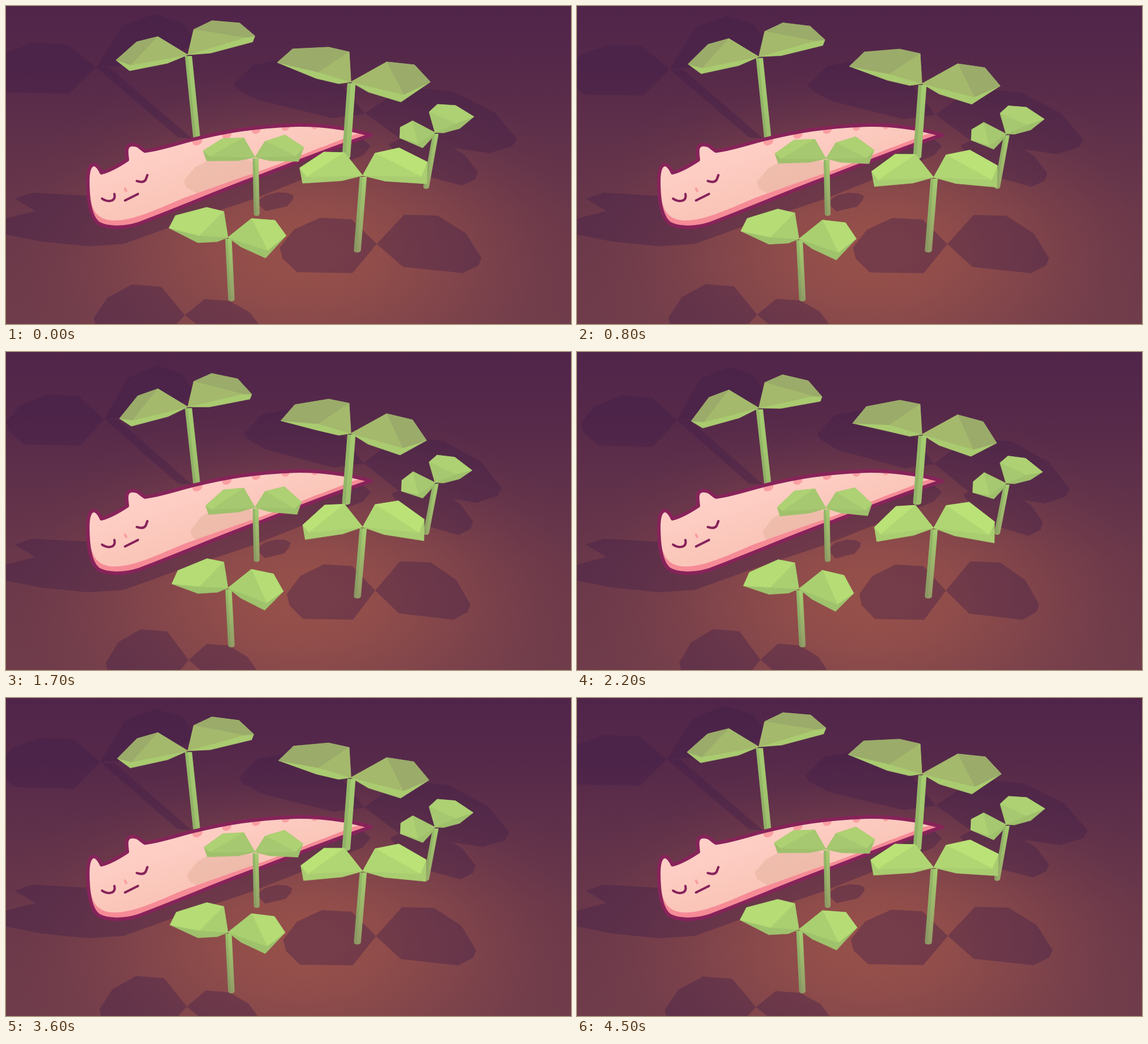
Recreate the animation shown at these times as an HTML page with a canvas. Size 960 px wide and 540 px high, loop 4600 ms.

```html
<!DOCTYPE html>
<html lang="en">
<head>
<meta charset="utf-8">
<title>Sleeping among sprouts</title>
<style>
html, body { margin: 0; width: 100%; height: 100%; overflow: hidden; background: #52264a; }
canvas { display: block; width: 960px; height: 540px; }
</style>
</head>
<body>
<canvas id="stage" width="960" height="540"></canvas>
<script>
const g = document.getElementById('stage').getContext('2d');
const LOOP = 4600, STEP = 100;
const FAR = ['#9bab6a', '#a4b96c', '#aacb70'];
const MID = ['#aed173', '#a6c870', '#a0c06c'];
const NEAR = ['#b5dc75', '#a9cf70', '#9fc26c'];
const BRIGHT = ['#bae277', '#b0d673', '#a9cd70'];
let sink = 0, droop = 0;

const lerp = (a, b, k) => [a[0] + (b[0] - a[0]) * k, a[1] + (b[1] - a[1]) * k];

function ease(t, from, to) {
  const u = Math.min(1, Math.max(0, (t - from) / (to - from)));
  return (1 - Math.cos(Math.PI * u)) / 2;
}

function trace(path, pts) {
  pts.forEach(([x, y], i) => i ? path.lineTo(x, y) : path.moveTo(x, y));
  path.closePath();
}

function fillPoly(pts, color) {
  const p = new Path2D();
  trace(p, pts);
  g.fillStyle = g.strokeStyle = color;
  g.lineWidth = .7;
  g.fill(p);
  g.stroke(p);
}

// keys: crown points from the joint outwards, then the tip and the low corner.
// The droop grows along the leaf and pulls the tip down and inwards.
function leaf(joint, fall, tones, keys) {
  const tip = keys[keys.length - 2];
  const dx = tip[0] - joint[0], len = Math.hypot(dx, tip[1] - joint[1]);
  const bend = ([x, y]) => {
    const r = Math.hypot(x - joint[0], y - joint[1]) / len;
    const k = (1.25 * r ** 3 - .25 * r) * droop;
    return [x - .06 * dx * k, y + .11 * len * k + fall];
  };
  const root = bend(joint), edge = keys.map(bend);
  const low = edge[edge.length - 1], crown = edge.slice(0, -1);
  const belly = lerp(root, low, .35);
  belly[1] += .04 * len;
  const ridge = crown[Math.floor((crown.length - 1) / 2)];
  const fold = lerp(low, ridge, .2);
  fillPoly([root, ...edge, belly], tones[2]);
  fillPoly([...crown, fold], tones[0]);
  fillPoly([root, crown[0], fold], tones[1]);
}

function stem(x, y, bx, by, w, foot) {
  const r = w / 2, s = g.createLinearGradient(0, y, 0, by);
  s.addColorStop(0, '#a5cd70');
  s.addColorStop(1, foot);
  g.fillStyle = s;
  g.beginPath();
  g.moveTo(x - r, y);
  g.lineTo(x + r, y);
  g.lineTo(bx + r, by - 2);
  g.ellipse(bx, by - 2, r, 3.5, 0, 0, Math.PI);
  g.fill();
  g.fillStyle = 'rgba(100,130,80,.25)';
  g.beginPath();
  g.moveTo(x - r, y);
  g.lineTo(x - r * .2, y);
  g.lineTo(bx - r * .2, by);
  g.lineTo(bx - r, by - 2);
  g.fill();
}

function sprout({ joint, foot, width, base, tones, left, right }) {
  const fall = .086 * (foot[1] - joint[1]) * sink;
  stem(joint[0] + 1, joint[1] + 2 + fall, foot[0], foot[1], width, base);
  leaf(joint, fall, tones, left);
  leaf(joint, fall, tones, right);
}

const backLeft = {
  joint: [309, 83], foot: [324, 225], width: 12, base: '#9dbd6d', tones: FAR,
  left: [[258, 52], [222, 61], [187, 92], [210, 110]],
  right: [[319, 40], [350, 25], [397, 29], [423, 51], [419, 61]]
};
const backRight = {
  joint: [586, 129], foot: [578, 258], width: 14, base: '#9fc06e', tones: FAR,
  left: [[583, 78], [548, 70], [487, 73], [461, 96], [527, 123]],
  right: [[647, 95], [694, 100], [721, 129], [671, 163]]
};
const small = {
  joint: [729, 215], foot: [714, 309], width: 10, base: '#98aa69', tones: MID,
  left: [[691, 195], [670, 206], [669, 224], [708, 241]],
  right: [[719, 180], [733, 167], [764, 169], [795, 188], [771, 208]]
};
const middle = {
  joint: [423, 257], foot: [426, 355], width: 10, base: '#94a068', tones: MID,
  left: [[404, 224], [368, 225], [335, 246], [341, 263]],
  right: [[440, 230], [474, 219], [506, 240], [497, 264]]
};
const frontRight = {
  joint: [606, 288], foot: [597, 417], width: 12, base: '#949b67', tones: BRIGHT,
  left: [[575, 249], [540, 248], [499, 275], [504, 301]],
  right: [[627, 250], [668, 241], [716, 265], [715, 302]]
};
const frontLeft = {
  joint: [377, 393], foot: [383, 500], width: 11, base: '#929c67', tones: NEAR,
  left: [[370, 349], [341, 342], [288, 356], [277, 377], [326, 402]],
  right: [[417, 361], [457, 364], [476, 390], [441, 428]]
};

function ground() {
  const v = g.createLinearGradient(0, 0, 0, 540);
  [[0, '#50254a'], [.2, '#56294a'], [.4, '#5f304a'], [.65, '#69374a'], [1, '#6f3c4b']]
    .forEach(([k, c]) => v.addColorStop(k, c));
  g.fillStyle = v;
  g.fillRect(0, 0, 960, 540);
  const r = g.createRadialGradient(0, 0, 0, 0, 0, 1);
  for (let k = 0; k <= 1; k += .125) {
    r.addColorStop(k, `rgba(154,82,74,${.92 * (1 - ease(k, 0, 1))})`);
  }
  g.save();
  g.translate(500, 415);
  g.scale(540, 320);
  g.fillStyle = r;
  g.fillRect(-2, -2, 4, 4);
  g.restore();
}

// Leaf shadow: a rounded polygon on the line from joint to tip.
// As the plant sinks, the joint nears the foot and the leaf shortens.
function cast(path, foot, joint, tip, up, low) {
  const mix = sink * .4 + droop * .6;
  const from = lerp(joint, foot, .1 * mix);
  const dx = (tip[0] - joint[0]) * (1 - .11 * mix), dy = tip[1] - joint[1];
  const at = (k, h) => [from[0] + dx * k, from[1] + dy * k + h];
  const pts = [from, at(.26, -up * .9), at(.58, -up), at(.85, -up * .62), at(1, 0),
    at(.97, low * .4), at(.82, low * .9), at(.25, low)];
  trace(path, dx < 0 ? pts.reverse() : pts);
}

const UNDER = new Path2D('M0 361 L50 348 L15 327 L45 317 L135 322 L300 300 L600 220 L620 238 ' +
  'L606 254 L520 288 L420 328 L300 368 L200 404 L140 408 L60 400 L0 388 Z');

function shadows() {
  const p = new Path2D();
  const hub = [153, 104], end = backLeft.foot;
  cast(p, end, hub, [-30, 108], 44, 44);
  cast(p, end, hub, [324, 62], 66, 8);
  const top = lerp(hub, end, .1 * sink);
  trace(p, [top, [top[0] + 22, top[1]], [end[0] - 8, end[1]], [end[0] - 32, end[1] - 2]]);
  cast(p, backRight.foot, [610, 183], [387, 132], 64, 20);
  cast(p, backRight.foot, [610, 182], [868, 225], 62, 36);
  cast(p, small.foot, [650, 235], [802, 282], 35, 35);
  cast(p, middle.foot, [425, 333], [489, 322], 10, 18);
  cast(p, frontRight.foot, [630, 404], [465, 410], 48, 48);
  cast(p, frontRight.foot, [630, 404], [808, 428], 62, 33);
  cast(p, frontLeft.foot, [304, 525], [149, 530], 55, 40);
  cast(p, frontLeft.foot, [304, 525], [433, 545], 36, 20);
  p.addPath(UNDER);
  g.fillStyle = 'rgba(64,30,73,.38)';
  g.fill(p);
}

const BODY = new Path2D('M163 284 C158 273 152 268 147 271 C141 275 139 290 140 310 ' +
  'C141 338 146 361 158 370 C172 378 200 379 225 371 C300 343 365 314 435 289 ' +
  'C500 264 560 240 621 220 C580 207 530 202 490 203 C420 206 378 213 320 227 ' +
  'C285 236 255 246 237 247 C229 243 227 236 215 236 C204 237 205 247 207 262 C195 270 178 280 163 284 Z');
const BELLY = new Path2D('M140 312 C147 343 150 363 183 365 C214 366 250 349 300 328 ' +
  'C380 298 450 277 520 247 C555 234 575 226 590 220 L612 214 L630 222 L560 260 L220 390 L130 380 Z');
const FACE = new Path2D('M164 328 Q173 334 181 331 Q187 328 185 320 M223 298 Q234 302 238 296 L241 288 M203 331 L225 320');

function sleeper() {
  g.save();
  g.translate(-.8, -.8);
  g.save();
  g.clip(BODY);
  const skin = g.createLinearGradient(290, 220, 330, 340);
  skin.addColorStop(0, '#ffd0c8');
  skin.addColorStop(1, '#f9c3b5');
  g.fillStyle = skin;
  g.fillRect(130, 190, 500, 200);
  const p = new Path2D();
  cast(p, middle.foot, [430, 272], [303, 297], 30, 30);
  g.fillStyle = 'rgba(209,158,130,.28)';
  g.fill(p);
  g.fillStyle = '#f68b97';
  g.fill(BELLY);
  g.fillStyle = '#fa9ea2';
  for (let i = 0; i < 5; i++) {
    g.beginPath();
    g.ellipse(326 + 50 * i, 230 - 12 * i + 1.4 * i * i, 9 - i * .7, 7 - i * .5, -.5, 0, 7);
    g.fill();
  }
  g.restore();
  g.lineCap = g.lineJoin = 'round';
  g.strokeStyle = '#87235a';
  g.lineWidth = 6;
  g.stroke(BODY);
  g.lineWidth = 4;
  g.stroke(FACE);
  g.strokeStyle = '#fa9ea2';
  g.beginPath();
  g.moveTo(203, 311);
  g.lineTo(205, 315);
  g.stroke();
  g.restore();
}

function draw(now) {
  const t = Math.floor(now % LOOP / STEP) * STEP;
  sink = ease(t, 0, 2300) - ease(t, 2900, 4400);
  droop = ease(t, 0, 2400) - ease(t, 2300, 4350);
  ground();
  shadows();
  sprout(backLeft);
  sleeper();
  [backRight, small, middle, frontRight, frontLeft].forEach(sprout);
}

const start = performance.now();
function tick() {
  draw(performance.now() - start);
  requestAnimationFrame(tick);
}
tick();
</script>
</body>
</html>
```
